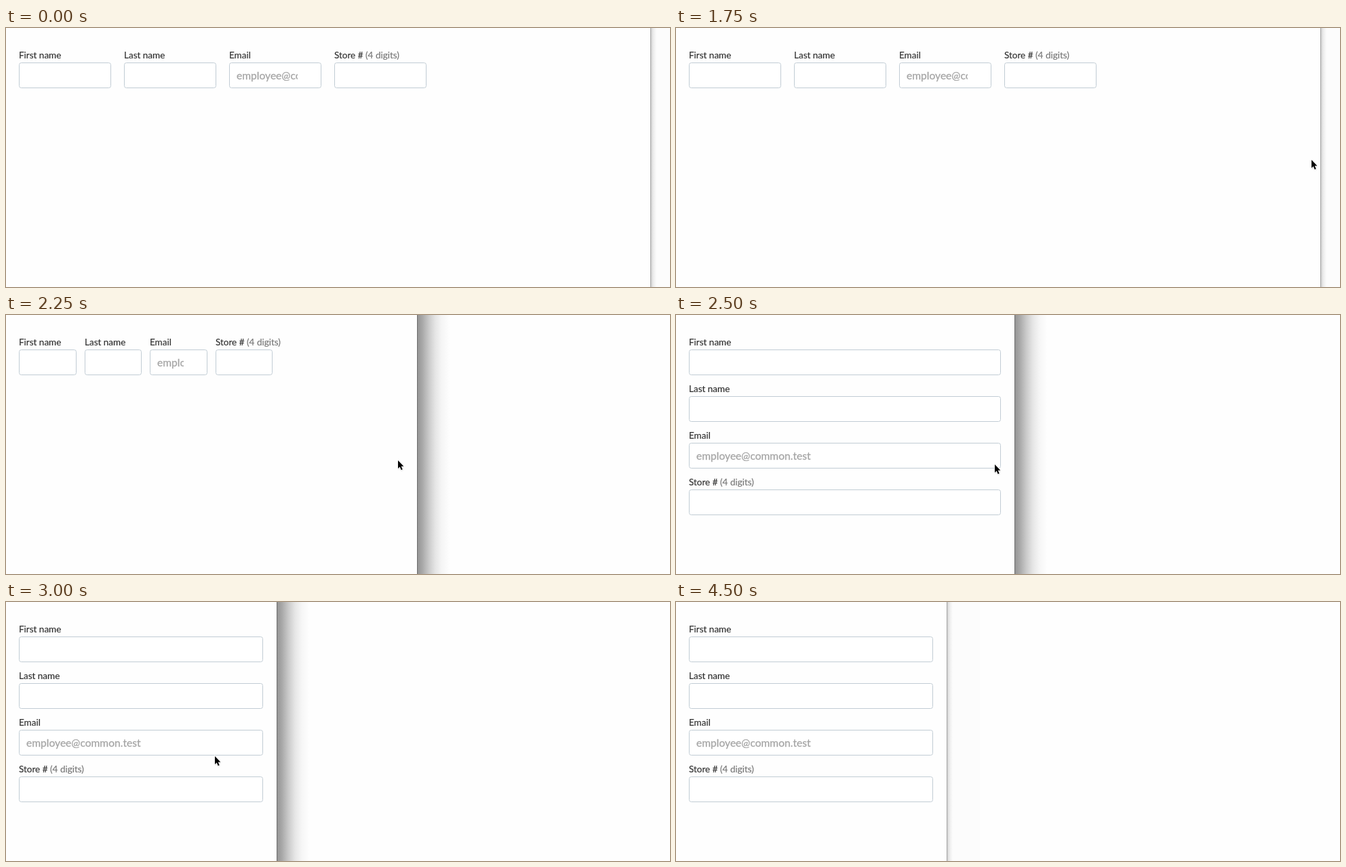
Animation, 979 px wide and 383 px high, one loop 4750 ms. Source, as an HTML page:

```html
<!DOCTYPE html>
<html lang="en">
<head>
<meta charset="utf-8">
<title>Responsive form</title>
<style>
  html, body { margin: 0; width: 100%; height: 100%; overflow: hidden; background: #fefefe; }
  svg { display: block; }
  #stage { width: 979px; height: 383px; font-family: Lato, "Open Sans", sans-serif; }
  .label { font-size: 13.5px; fill: #333; stroke: #333; stroke-width: .2px; }
  .hint { fill: #777; stroke: #777; }
  .hold { font-size: 15.6px; fill: #a5a5a5; stroke: #a5a5a5; stroke-width: .3px; }
  .box { fill: #fff; stroke: #c1ccd4; }
  .box.hover { stroke: #a4b6c2; }
</style>
</head>
<body>
<svg id="stage" viewBox="0 0 979 383">
  <defs>
    <linearGradient id="deep">
      <stop offset="0" stop-color="#959595"/>
      <stop offset=".15" stop-color="#a9a9a9"/>
      <stop offset=".35" stop-color="#cacaca"/>
      <stop offset=".55" stop-color="#e5e5e5"/>
      <stop offset=".75" stop-color="#f5f5f5"/>
      <stop offset="1" stop-color="#fefefe"/>
    </linearGradient>
    <linearGradient id="thin">
      <stop offset="0" stop-color="#d2d2d2"/>
      <stop offset=".4" stop-color="#ebebeb"/>
      <stop offset="1" stop-color="#fcfcfc"/>
    </linearGradient>
    <filter id="soft" x="-50%" y="-50%" width="200%" height="200%">
      <feGaussianBlur stdDeviation="1"/>
    </filter>
  </defs>
  <rect width="979" height="383" fill="#fefefe"/>
  <rect id="tail" y="0" width="40" height="383" fill="#fcfcfc"/>
  <rect id="shade" y="0" height="383"/>
  <rect id="page" width="950" height="383" fill="#fefefe"/>
  <rect id="edge" width="1" height="383"/>
  <g id="form"></g>
  <g id="cursor">
    <path d="M0 1V13L3 10.500L5 15L7 14L5 10H8.500Z" fill="#000" opacity=".35" filter="url(#soft)"/>
    <path d="M0 0V12L2.700 9.500L4.700 14.200L6.700 13.300L4.700 8.800H8.400Z" fill="#000"
      stroke="#fff" stroke-width="1.600" paint-order="stroke"/>
  </g>
</svg>
<script>
const LOOP = 4750;
const STACK_BELOW = 560;

// start time, page width, cursor position, shadow, hovered email field
const steps = [
  [0, 951, null, "thin"],
  [750, 951, [954, 184], "thin"],
  [1000, 951, [941, 184], "thin"],
  [1250, 951, [942, 189], "thin"],
  [1500, 951, [947, 191], "thin"],
  [1750, 951, [937, 195], "thin"],
  [2000, 803, [763, 208], "deep"],
  [2250, 607, [578, 215], "deep"],
  [2500, 500, [470, 221], "deep"],
  [2750, 400, [371, 225], "deep"],
  [3000, 400, [308, 228], "deep"],
  [3250, 400, [305, 228], "deep"],
  [3500, 400, [381, 211], "deep", true],
  [3750, 400, null, "deep"],
  [4500, 400, null, "thin"]
];

const fields = [
  { label: "First name" },
  { label: "Last name" },
  { label: "Email", hold: "employee@common.test" },
  { label: "Store #", hint: "(4 digits)" }
];

const $ = id => document.getElementById(id);
const set = (el, attrs) => {
  for (const key in attrs) el.setAttribute(key, attrs[key]);
};

function fieldMarkup(field, i, width, hover) {
  const inner = width - 40;
  const stacked = width < STACK_BELOW;
  const left = stacked ? 19 : 19 + i * inner * 0.1702;
  const x = Math.round(left);
  const w = stacked ? inner : Math.round(left + inner * 0.1492) - x;
  const y = stacked ? i * 69 : 0;
  const hint = field.hint ? ` <tspan class="hint">${field.hint}</tspan>` : "";
  const box = hover && field.hold ? "box hover" : "box";
  const hold = field.hold
    ? `<svg x="${x + 11}" y="${y + 52}" width="${w - 46}" height="36" overflow="hidden">
         <text class="hold" x="0" y="24">${field.hold}</text></svg>`
    : "";
  return `<text class="label" x="${x}" y="${y + 45}">${field.label}${hint}</text>
    <rect class="${box}" x="${x + 0.5}" y="${y + 51.5}" width="${w - 1}" height="37" rx="3"/>${hold}`;
}

function draw([, width, pointer, shadow, hover]) {
  const deep = shadow === "deep";
  set($("page"), { width: width - 1 });
  set($("edge"), { x: width - 1, fill: deep ? "#6c6c6c" : "#a2a2a2" });
  set($("shade"), { x: width, width: deep ? 47 : 8, fill: `url(#${shadow})` });
  set($("tail"), { x: width + 8, visibility: deep ? "hidden" : "visible" });
  $("form").innerHTML = fields.map((f, i) => fieldMarkup(f, i, width, hover)).join("");
  set($("cursor"), {
    visibility: pointer ? "visible" : "hidden",
    transform: `translate(${pointer || [0, 0]})`
  });
}

let shown = null;
function tick() {
  const time = performance.now() % LOOP;
  const step = steps.filter(s => s[0] <= time).pop();
  if (step !== shown) draw(shown = step);
  requestAnimationFrame(tick);
}
tick();
</script>
</body>
</html>
```
